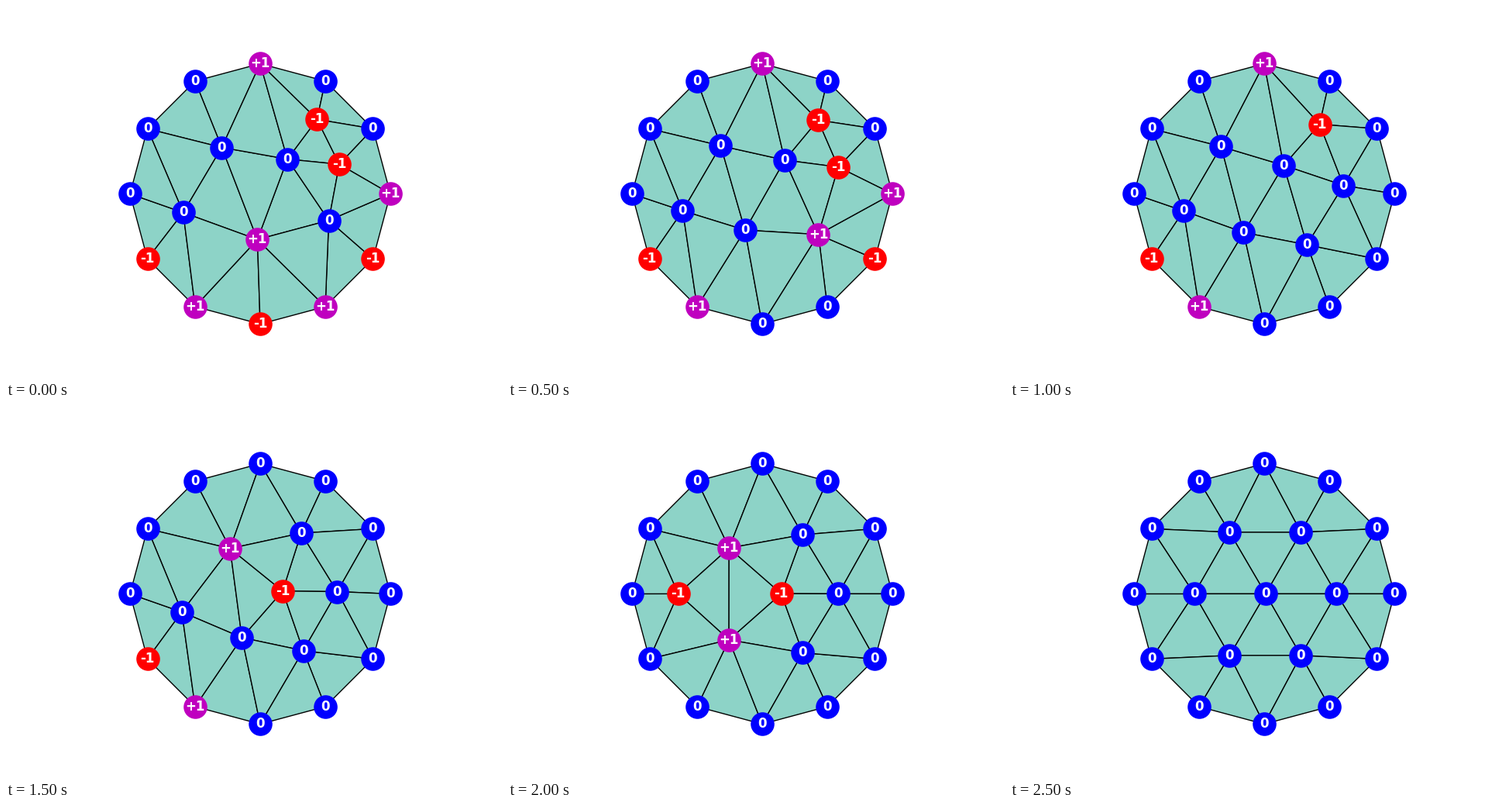
Write a matplotlib script that moves like this. It is 640 px wide and 480 px high and loops after 3 s.

```python
import numpy as np
import matplotlib.pyplot as plt
from matplotlib.animation import FuncAnimation
from matplotlib.collections import PolyCollection
from matplotlib.tri import Triangulation

W, H, DPI = 640, 480, 100
CENTER = np.array([328, 242.4])
RADIUS = 168
COLORS = {-1: "r", 0: "b", 1: "m"}
RIM = 12

# Regular degree: 3 and 4 alternate on the rim, 6 inside
REGULAR = np.array([3, 4] * 6 + [6] * 7)

# Edges of the regular mesh that get flipped away, last repair first
UNDO = [(15, 18), (5, 14), (16, 17), (1, 12), (3, 13)]


def ring(count, radius):
    a = 2 * np.pi * np.arange(count) / count
    return CENTER + radius * np.column_stack([np.cos(a), np.sin(a)])


def flip(triangles, edge):
    """Swap the diagonal of the quad around an edge; return the new edge too."""
    ends = set(edge)
    pair = [t for t in triangles if ends <= set(t)]
    a, b = (min(set(t) - ends) for t in pair)
    kept = [t for t in triangles if t not in pair]
    return kept + [(a, b, v) for v in edge], (a, b)


def adjacency(triangles):
    t = np.array(triangles)
    adj = np.zeros((len(REGULAR), len(REGULAR)), int)
    for i, j in [(0, 1), (1, 2), (2, 0)]:
        adj[t[:, i], t[:, j]] = adj[t[:, j], t[:, i]] = 1
    return adj


def smooth(points, adj, steps):
    """Move every inner vertex to the mean of its neighbours."""
    points = points.copy()
    for _ in range(steps):
        mean = adj @ points / adj.sum(axis=1, keepdims=True)
        points[RIM:] = mean[RIM:]
    return points


def make_stages():
    points = np.vstack([ring(RIM, RADIUS), ring(6, 0.55 * RADIUS), CENTER])
    triangles = [tuple(map(int, t)) for t in Triangulation(*points.T).triangles]
    repairs = []
    for edge in UNDO:
        triangles, new = flip(triangles, edge)
        repairs.insert(0, new)

    stages = []
    steps = 200
    for edge in [None, *repairs]:
        if edge:
            triangles, _ = flip(triangles, edge)
        adj = adjacency(triangles)
        points = smooth(points, adj, steps)
        stages.append((points, np.array(triangles), adj.sum(axis=1) - REGULAR))
        steps = 3
    return stages


stages = make_stages()

fig = plt.figure(figsize=(W / DPI, H / DPI), dpi=DPI, facecolor="white")
ax = fig.add_axes([0, 0, 1, 1])
ax.set(xlim=(0, W), ylim=(H, 0))
ax.axis("off")

faces = PolyCollection([], facecolors="#8dd3c7", edgecolors="black",
                       linewidths=1, zorder=1)
ax.add_collection(faces, autolim=False)
dots = {charge: ax.plot([], [], color + "o", ms=22, mew=0, zorder=2)[0]
        for charge, color in COLORS.items()}
labels = [ax.text(0, 0, "", color="white", fontsize=12, weight="bold",
                  family="DejaVu Sans", ha="center", va="center", zorder=3)
          for _ in REGULAR]


def update(i):
    points, triangles, charges = stages[i]
    faces.set_verts(points[triangles])
    for charge, dot in dots.items():
        dot.set_data(*points[charges == charge].T)
    for text, point, charge in zip(labels, points, charges):
        text.set_position(point)
        text.set_text(f"{charge:+d}" if charge else "0")
    return [faces, *dots.values(), *labels]


anim = FuncAnimation(fig, update, frames=len(stages), interval=500,
                     repeat=True, repeat_delay=0, blit=False)
plt.show()
```
